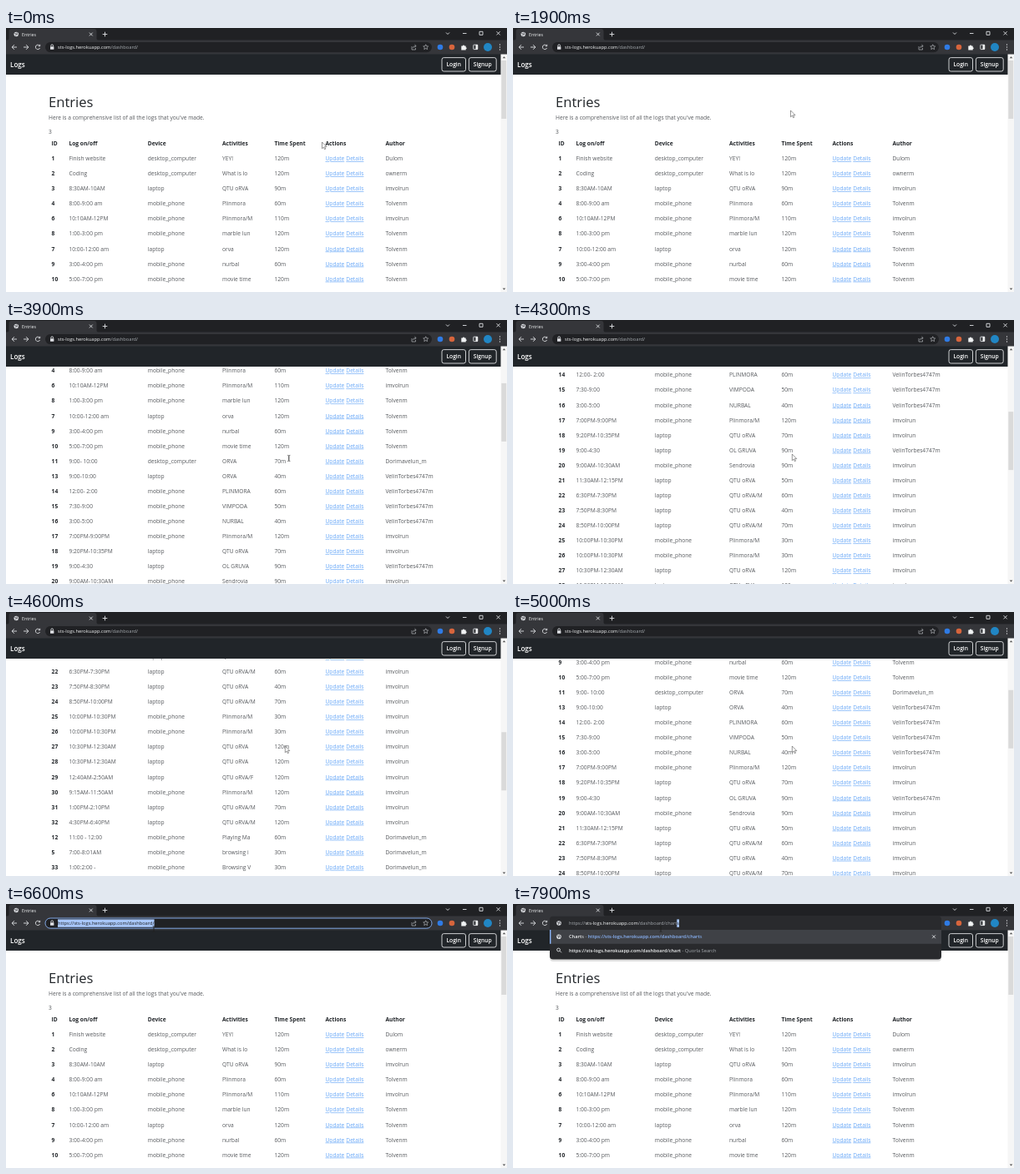
Recreate the animation shown at these times as an HTML page. Size 600 by 317 pixels, loop 8000 ms.

```html
<!DOCTYPE html>
<html lang="en">
<head>
<meta charset="utf-8">
<title>Entries</title>
<style>
html, body { margin: 0; width: 100%; height: 100%; overflow: hidden; background: #fff; }
svg { display: block; width: 100%; height: 100%; }
text { font: 6.65px "Open Sans", "Noto Sans", sans-serif; fill: #56595d; white-space: pre; }
.b { font-weight: 700; fill: #212529; }
.h1 { font-size: 16.6px; font-weight: 500; fill: #212529; }
.link { fill: #69a8f7; text-decoration: underline; text-decoration-color: #9cc5fa; }
.nav { font-size: 6.7px; font-weight: 600; fill: #fff; }
.ui { font-size: 5.7px; font-weight: 500; fill: #f1f3f4; }
.dim { fill: #a4a9ae; font-weight: 400; }
.hit { font-weight: 600; }
.blue { fill: #8ab4f8; }
.line { fill: none; stroke: #dfe1e5; stroke-width: .9; }
</style>
</head>
<body>
<svg viewBox="0 0 600 317">
  <defs>
    <g id="globe"><circle r="2.8" fill="#dfe1e5"/><path d="M-2-1.2L0-.4-.6 1.8M.8-2.2L1 0 2.3.8" fill="none" stroke="#35363a" stroke-width=".8"/></g>
    <path id="x" class="line" d="M-1.9-1.9L1.9 1.9M1.9-1.9L-1.9 1.9"/>
  </defs>

  <rect width="600" height="317" fill="#fff"/>
  <g id="page">
    <text class="h1" x="51" y="95">Entries</text>
    <text x="51" y="109.6">Here is a comprehensive list of all the logs that you've made.</text>
    <text x="51" y="127.4">3</text>
  </g>

  <rect x="592.5" y="31" width="7.5" height="286" fill="#f6f6f6"/>
  <rect id="thumb" x="593.3" y="39" width="5.9" height="70" fill="#dadada"/>
  <path d="M594.7 36.3h3.6l-1.8-2zM594.7 312.4h3.6l-1.8 2z" fill="#505050"/>

  <rect y="31" width="592.5" height="25" fill="#212529"/>
  <text class="nav" x="5" y="47.2" style="font-size:8.1px">Logs</text>
  <g fill="none" stroke="#f8f9fa" stroke-width=".8">
    <rect x="522" y="35.6" width="28.5" height="16.4" rx="2.4"/>
    <rect x="554.4" y="35.6" width="32.8" height="16.4" rx="2.4"/>
  </g>
  <text class="nav" x="536.2" y="46.3" text-anchor="middle">Login</text>
  <text class="nav" x="570.8" y="46.3" text-anchor="middle">Signup</text>

  <rect width="600" height="15" fill="#202124"/>
  <path d="M1 15q2.5 0 2.5-3V4q0-3 3-3h99q3 0 3 3v8q0 3 2.5 3z" fill="#35363a"/>
  <rect y="14.5" width="600" height="17" fill="#35363a"/>
  <use href="#globe" x="12.3" y="7.5"/>
  <text class="ui" x="19" y="9.5" style="font-size:5.3px">Entries</text>
  <use href="#x" x="101.8" y="7.5"/>
  <g class="line">
    <path d="M118.5 4.7v5.6M115.7 7.5h5.6"/>
    <path d="M527 5.5l2 2 2-2M547 6.5h4.5M567 4.3h4v4h-4zM587.5 4.2l4.2 4.2M591.7 4.2l-4.2 4.2"/>
    <path d="M13 23H7.2M9.9 20.2L7.1 23l2.8 2.8"/>
    <path d="M21 23h5.8M24.1 20.2l2.8 2.8-2.8 2.8"/>
    <path d="M40.3 21.3A2.7 2.7 0 1 0 40.6 24M40.7 19.8v2h-2"/>
  </g>
  <rect x="47" y="17" width="463" height="12.2" rx="6.1" fill="#202124"/>
  <g id="lock"><path d="M53.8 22.3v-1a1.4 1.4 0 0 1 2.8 0v1" class="line"/><rect x="53" y="22.2" width="4.4" height="3.5" rx=".5" fill="#dfe1e5"/></g>
  <g class="line" style="stroke:#b4b7bb;stroke-width:.7">
    <path d="M486 22v4h4.5v-2M487.5 24q0-2.4 3.5-2.4M489.5 20l1.7 1.6-1.7 1.6"/>
    <path d="M502.7 19.8l.9 2 2.1.2-1.6 1.5.5 2.1-1.9-1.1-1.9 1.1.5-2.1-1.6-1.5 2.1-.2z"/>
  </g>
  <rect x="559.8" y="20.2" width="5" height="5.4" rx=".5" class="line"/>
  <circle cx="520" cy="23" r="3.3" fill="#2f7be5"/>
  <circle cx="534" cy="23" r="3.3" fill="#d8653c"/>
  <path d="M545.3 21.4h1.7a1 1 0 0 1 2 0h1.7v1.8a1 1 0 0 1 0 2v1.2h-5.4z" fill="#f1f3f4"/>
  <path d="M562.5 20h2.4v5.8h-2.4z" fill="#f1f3f4"/>
  <circle cx="577" cy="23" r="5" fill="#2186c4"/>
  <path d="M591.5 20v.1M591.5 23v.1M591.5 26v.1" stroke="#dfe1e5" stroke-width="1.3" stroke-linecap="round"/>

  <g id="drop">
    <rect x="44" y="15" width="469" height="54" rx="4" fill="#000" opacity=".13"/>
    <rect x="44" y="14.7" width="469" height="51.8" rx="4" fill="#292a2d"/>
    <rect x="44" y="31" width="469" height="16.8" fill="#3f4146"/>
    <rect x="44" y="31" width="1.4" height="16.8" fill="#8ab4f8"/>
    <use href="#globe" x="55" y="23"/>
    <use href="#globe" x="55" y="39.3"/>
    <use href="#x" x="504" y="39.3"/>
    <path class="line" d="M56 56.3l2 2M56.4 55a1.9 1.9 0 1 0-3.8 0 1.9 1.9 0 0 0 3.8 0"/>
    <text id="best" class="ui" x="67" y="41.3"></text>
    <text id="search" class="ui" x="67" y="58.2"></text>
  </g>
  <rect id="sel" y="18.4" height="9.4" fill="#a8c7fa"/>
  <text id="url" class="ui" y="25.1"></text>
  <rect id="ring" x="47" y="17" width="463" height="12.2" rx="6.1" fill="none" stroke="#8ab4f8" stroke-width=".9"/>

  <path id="arrow" d="M0 0v7.8l1.8-1.7 1.2 2.6 1.3-.5-1.2-2.6h2.4z" fill="#fff" stroke="#444" stroke-width=".55"/>
  <path id="beam" d="M-1.6-3.6q1.6 0 1.6.8v5.6q0 .8-1.6.8M1.6-3.6q-1.6 0-1.6.8v5.6q0 .8 1.6.8" fill="none" stroke="#222" stroke-width=".6"/>
</svg>
<script>
const $ = id => document.getElementById(id);
const columns = [54.6, 75.5, 169.8, 259, 321.5, 382.5, 454.5];
const devices = { d: 'desktop_computer', l: 'laptop', m: 'mobile_phone' };
const authors = { R: 'Dulom', A: 'ownerm', I: 'imvolrun', J: 'Tolvenm', K: 'Dorimavelun_m', M: 'VelinTorbes4747m' };
// id|time|device|activity|minutes|author
const rows = `1|Finish website|d|YEY!|120|R
2|Coding|d|What is lo|120|A
3|8:30AM-10AM|l|QTU oRVA|90|I
4|8:00-9:00 am|m|Plinmora|60|J
6|10:10AM-12PM|m|Plinmora/M|110|I
8|1:00-3:00 pm|m|marble lun|120|J
7|10:00-12:00 am|l|orva|120|J
9|3:00-4:00 pm|m|nurbal|60|J
10|5:00-7:00 pm|m|movie time|120|J
11|9:00- 10:00|d|ORVA|70|K
13|9:00-10:00|l|ORVA|40|M
14|12:00- 2:00|m|PLINMORA|60|M
15|7:30-9:00|m|VIMPODA|50|M
16|3:00-5:00|m|NURBAL|40|M
17|7:00PM-9:00PM|m|Plinmora/M|120|I
18|9:20PM-10:35PM|l|QTU oRVA|70|I
19|9:00-4:30|l|OL GRUVA|90|M
20|9:00AM-10:30AM|m|Sendrovia|90|I
21|11:30AM-12:15PM|l|QTU oRVA|50|I
22|6:30PM-7:30PM|l|QTU oRVA/M|60|I
23|7:50PM-8:30PM|l|QTU oRVA|40|I
24|8:50PM-10:00PM|l|QTU oRVA/M|70|I
25|10:00PM-10:30PM|m|Plinmora/M|30|I
26|10:00PM-10:30PM|m|Plinmora/M|30|I
27|10:30PM-12:30AM|l|QTU oRVA|120|I
28|10:30PM-12:30AM|l|QTU oRVA|120|I
29|12:40AM-2:50AM|l|QTU oRVA/F|120|I
30|9:15AM-11:50AM|m|Plinmora/M|120|I
31|1:00PM-2:10PM|l|QTU oRVA/M|70|I
32|4:30PM-6:40PM|l|QTU oRVA/M|120|I
12|11:00 - 12:00|m|Playing Ma|60|K
5|7:00-8:01AM|m|browsing i|30|K
33|1:00:2:00 -|m|Browsing V|30|K`.split('\n');

const cell = (x, y, str, cls = '') => `<text x="${x}" y="${y}" class="${cls}">${str}</text>`;
const span = (str, cls) => `<tspan class="${cls}">${str}</tspan>`;
const dark = str => `<tspan style="fill:#202124">${str}</tspan>`;

let table = ['ID', 'Log on/off', 'Device', 'Activities', 'Time Spent', 'Actions', 'Author']
  .map((str, i) => cell(columns[i], 141.3, str, 'b')).join('');
rows.forEach((row, i) => {
  const [id, time, device, activity, minutes, author] = row.split('|');
  const y = 159.2 + 18.05 * i;
  [id, time, devices[device], activity, minutes + 'm', , authors[author]]
    .forEach((str, c) => table += cell(columns[c], y, str, c ? '' : 'b'));
  table += cell(columns[5], y, 'Update', 'link') + cell(407.3, y, 'Details', 'link');
});
$('page').innerHTML += table;

const host = 'sts-logs.herokuapp.com', path = '/dashboard/';
const full = 'https://' + host + path;
$('best').innerHTML = span('Chart', 'hit') + 's' + span(' - ', 'dim') + span(full + 'chart', 'hit blue') + span('s', 'blue');

// Each key is [time, ...values]
const scrollKeys = [[3400, 0], [3900, 150], [4100, 220], [4200, 220], [4500, 428], [4600, 428],
  [5000, 222.5], [5300, 88], [5400, 88], [5600, 33.3], [5800, 0]];
const mouseKeys = [[1000, 378.5, 137], [1900, 332.5, 99], [3000, 332.5, 99], [3600, 334.3, 161],
  [5800, 334.3, 161], [6300, 177, 27]];
const typeTimes = [7100, 7300, 7400, 7600, 7900];

function at(keys, t) {
  const i = keys.findIndex(k => k[0] > t);
  if (i < 1) return (i ? keys[keys.length - 1] : keys[0]).slice(1);
  const a = keys[i - 1], b = keys[i], u = (t - a[0]) / (b[0] - a[0]);
  return a.slice(1).map((v, j) => v + (b[j + 1] - v) * u);
}
const show = (id, on) => $(id).style.display = on ? '' : 'none';

function drawUrl(t) {
  const typed = 'chart'.slice(0, typeTimes.filter(k => k <= t).length);
  const focus = t >= 6600, all = focus && t < 6800, open = typed !== '';
  const url = $('url'), sel = $('sel');
  const x = open ? 67 : 62;
  url.setAttribute('x', x);
  const head = (focus ? span('https://', 'dim') : '') + host + span(path + typed, 'dim');
  url.innerHTML = head;
  const width = url.getComputedTextLength();
  if (open) {
    url.innerHTML = head + dark('charts'.slice(typed.length));
    $('search').innerHTML = span(full + typed, 'hit') + span(' - Quorla Search', 'dim');
  }
  if (all) url.innerHTML = dark(full);
  sel.setAttribute('x', all ? x : x + width);
  sel.setAttribute('width', all ? width : open ? url.getComputedTextLength() - width : .6);
  show('sel', focus);
  show('ring', focus && !open);
  show('drop', open);
  show('lock', !open);
}

let last = -1;
function frame(now) {
  const t = Math.floor(now % 8000 / 100) * 100;
  if (t !== last) {
    last = t;
    const [scroll] = at(scrollKeys, t), [x, y] = at(mouseKeys, t);
    $('page').setAttribute('transform', `translate(0 ${-scroll})`);
    $('thumb').setAttribute('y', 39 + scroll * .246);
    const beam = t >= 3700 && t < 4300 || t >= 6300;
    show('beam', beam);
    show('arrow', !beam);
    $('arrow').setAttribute('transform', `translate(${x} ${y})`);
    $('beam').setAttribute('transform', t < 6300 ? 'translate(338.8 166)' : `translate(${x} ${y + 3})`);
    drawUrl(t);
  }
  requestAnimationFrame(frame);
}
requestAnimationFrame(frame);
</script>
</body>
</html>
```
